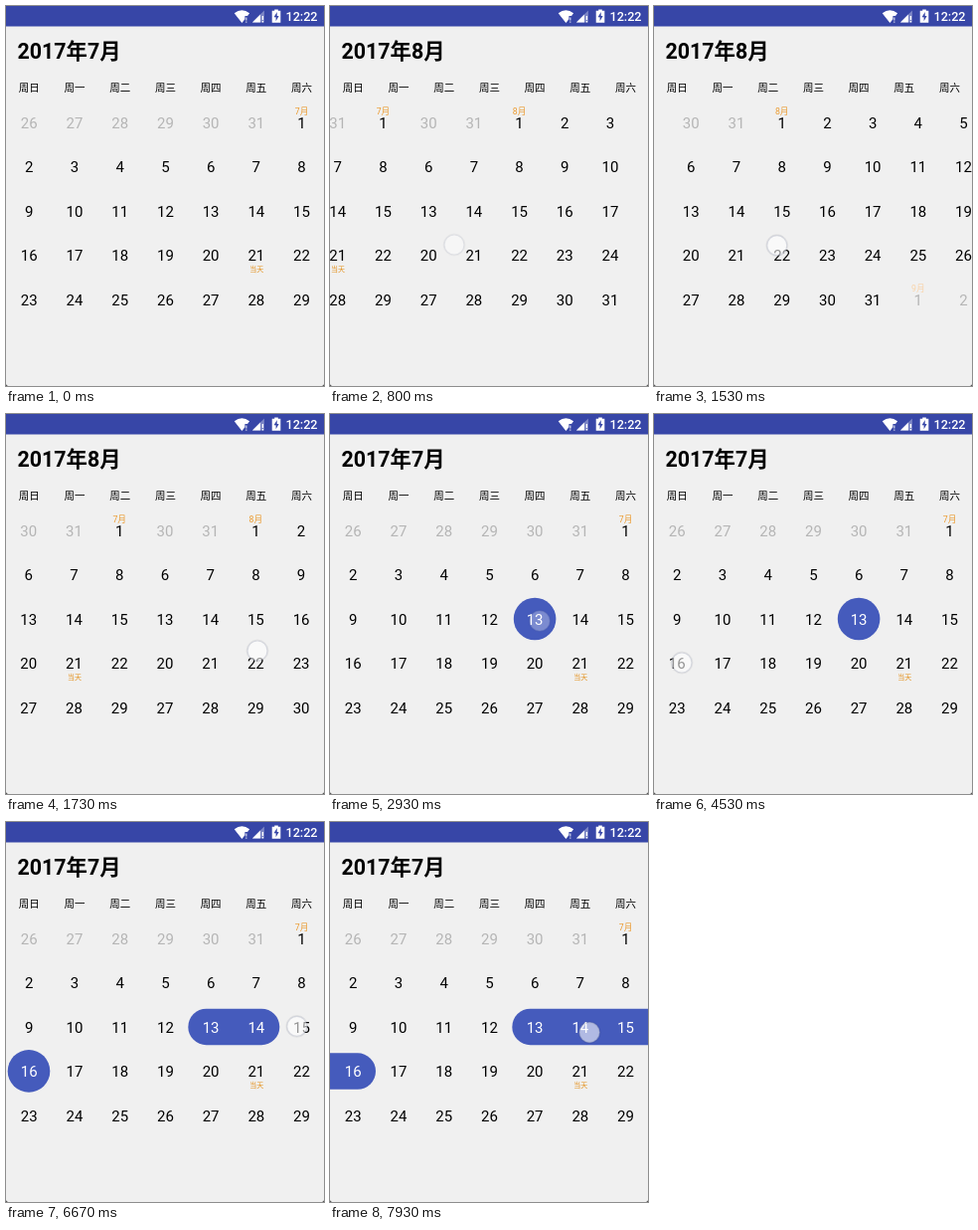
An HTML page that plays this animation: 320 by 382 pixels, repeating every 8 s.

```html
<!DOCTYPE html>
<html lang="zh-CN">
<head>
<meta charset="utf-8">
<title>日历</title>
<style>
  html, body { margin: 0; width: 100%; height: 100%; overflow: hidden; background: #222; }
  svg { display: block; width: 320px; height: 382px; }
  text { font-family: Roboto, "Noto Sans CJK SC", "Noto Sans CJK JP", sans-serif; fill: #000; }
  .mid { text-anchor: middle; }
  .title { font-size: 21.4px; font-weight: 700; }
  .week { font-size: 10.5px; }
  .day { font-size: 15px; }
  .month { font-size: 8.7px; fill: #eb9a2f; }
  .today { font-size: 7px; font-weight: 500; fill: #e4921f; }
  .other .day { fill: #b5b5b5; }
  .other .month { fill: #f9d3a8; }
  .day.on { fill: #fff; }
  .clock { font-size: 12.6px; font-weight: 500; fill: #fff; }
  .mark { fill: #455bbc; }
</style>
</head>
<body>
<svg viewBox="0 0 320 382">
  <rect width="320" height="382" rx="2.5" fill="#f0f0f0"/>
  <rect width="320" height="20.5" fill="#3746a7"/>
  <g transform="translate(.4 -.5)">
    <g fill="#fff">
      <path d="M237 17.5 229.3 7.8Q237 1.5 244.7 7.8L242.6 10.5H240V13.8Z"/>
      <path d="M240.8 12h1.2v3h-1.2zM240.8 16h1.2v1.2h-1.2z" opacity=".8"/>
      <path d="M247.5 17 259.5 5V17Z" opacity=".35"/>
      <path d="M247.5 17 255.5 9V17Z"/>
      <path d="M257.3 10.5h1.3v4h-1.3zM257.3 15.5h1.3v1.5h-1.3z"/>
      <path d="M267.3 5.3h2.5V4h3.6v1.3h2.5V17.3h-8.6Z"/>
    </g>
    <path d="M272.3 6.5 269.2 11.8H271.2V15.8L274.2 10.4H272.3Z" fill="#3746a7"/>
  </g>
  <text class="clock" x="281.5" y="14.8">12:22</text>
  <text class="title" id="title" x="11.5" y="53">2017年7月</text>
  <g id="weekdays"></g>
  <g id="marks">
    <circle class="mark" cx="206.1" cy="206" r="21.3"/>
    <circle class="mark" cx="23" cy="250.4" r="21.3"/>
    <rect class="mark" x="183.3" y="187.7" width="92" height="36.5" rx="18.25"/>
    <rect class="mark" x="183.3" y="187.7" width="170" height="36.5" rx="18.25"/>
    <rect class="mark" x="-40" y="232.3" width="86" height="36.5" rx="18.25"/>
  </g>
  <g id="track"></g>
  <g id="touch">
    <circle r="11" fill="none" stroke="#000" stroke-opacity=".05"/>
    <circle r="10" fill="#fff" fill-opacity=".58" stroke="#aaafbe" stroke-opacity=".42" stroke-width="1.2"/>
  </g>
</svg>
<script>
const $ = id => document.getElementById(id);
const NS = 'http://www.w3.org/2000/svg';
const LOOP = 8000, TICK = 200 / 3, WIDTH = 320;
const colX = c => (c + 0.5) * WIDTH / 7 + 0.4;
const rowY = r => 117.5 + r * 44.5;

function add(parent, tag, attrs = {}, content = '') {
  const el = document.createElementNS(NS, tag);
  for (const name in attrs) el.setAttribute(name, attrs[name]);
  el.textContent = content;
  return parent.appendChild(el);
}
const label = (parent, cls, x, y, content) =>
  add(parent, 'text', { class: 'mid ' + cls, x, y }, content);

[...'日一二三四五六'].forEach((d, i) => label($('weekdays'), 'week', colX(i), 85.6, '周' + d));

// Five weeks from the Sunday on or before the 1st; every month counts 31 days here.
function buildPage(month, left) {
  const page = add($('track'), 'g', { transform: `translate(${left} 0)` });
  const lead = new Date(2017, month - 1, 1).getDay();
  const days = {};
  for (let i = 0; i < 35; i++) {
    const offset = i - lead;
    const n = (offset + 31) % 31 + 1, m = month + Math.floor(offset / 31);
    const x = colX(i % 7), y = rowY(Math.floor(i / 7));
    const cell = add(page, 'g', { class: m === month ? '' : 'other' });
    const day = label(cell, 'day', x, y + 5.2, n);
    if (m === month) days[n] = day;
    if (n === 1) label(cell, 'month', x, y - 8.2, m + '月');
    if (m === 7 && n === 21) label(cell, 'today', x + 0.4, y + 16.3, '当天');
  }
  return days;
}
const july = buildPage(7, 0);
buildPage(8, WIDTH);

const clamp = v => Math.min(1, Math.max(0, v));
const progress = (t, from, to) => clamp((t - from) / (to - from));
const lerp = (a, b, u) => a + (b - a) * u;
const quintOut = u => 1 - (1 - u) ** 5;
const drag = u => u ** 1.6;

// Finger: down and up times, fade length, start and end points, time the movement begins
const touches = [
  { down: 400, up: 709, fade: 270, from: [283, 243], to: [125, 240], move: 470 },
  { down: 1400, up: 1733, fade: 267, from: [109, 241], to: [253, 238], move: 1470 },
  { down: 2730, up: 2800, fade: 270, from: [211, 208], to: [211, 208], move: 2730 },
  { down: 4530, up: 4733, fade: 267, from: [28, 250], to: [28, 250], move: 4530 },
  { down: 5930, up: 6000, fade: 267, from: [252, 208], to: [252, 208], move: 5930 },
  { down: 6530, up: 6780, fade: 220, from: [292, 205], to: [294, 206], move: 6530 },
  { down: 7795, up: 8000, fade: 200, from: [259, 211], to: [263, 212], move: 7795 }
];

function trackX(t) {
  if (t < 709) return lerp(0, -150, drag(progress(t, 470, 709)));
  if (t < 1400) return lerp(-150, -WIDTH, quintOut(progress(t, 709, 1320)));
  if (t < 1740) return lerp(-WIDTH, -183.3, drag(progress(t, 1470, 1733)));
  return lerp(-183.3, 0, quintOut(progress(t, 1740, 2120)));
}

// Times at which 13, 16, 14 and 15 become selected
const picks = [[2800, 13], [4730, 16], [6000, 14], [6800, 15]];
const marksByStep = [[], [0], [0, 1], [2, 1], [3, 4]];

function render(t) {
  $('track').setAttribute('transform', `translate(${trackX(t).toFixed(2)} 0)`);
  $('title').textContent = `2017年${t >= 709 && t < 1740 ? 8 : 7}月`;

  const step = picks.filter(([at]) => t >= at).length;
  [...$('marks').children].forEach((m, i) => {
    m.style.display = marksByStep[step].includes(i) ? '' : 'none';
  });
  picks.forEach(([at, n]) => july[n].classList.toggle('on', t >= at));

  const touch = touches.find(p => t >= p.down && t < p.up + p.fade);
  $('touch').style.display = touch ? '' : 'none';
  if (!touch) return;
  const u = drag(progress(t, touch.move, touch.up));
  const [x, y] = touch.from.map((v, i) => lerp(v, touch.to[i], u));
  $('touch').setAttribute('transform', `translate(${x.toFixed(2)} ${y.toFixed(2)})`);
  $('touch').style.opacity = 1 - progress(t, touch.up, touch.up + touch.fade);
}

// The screen advances at 15 pictures a second.
const start = performance.now();
function loop() {
  const t = (performance.now() - start) % LOOP;
  render(Math.floor((t + 5) / TICK) * 200 / 3 % LOOP);
  requestAnimationFrame(loop);
}
loop();
</script>
</body>
</html>
```
